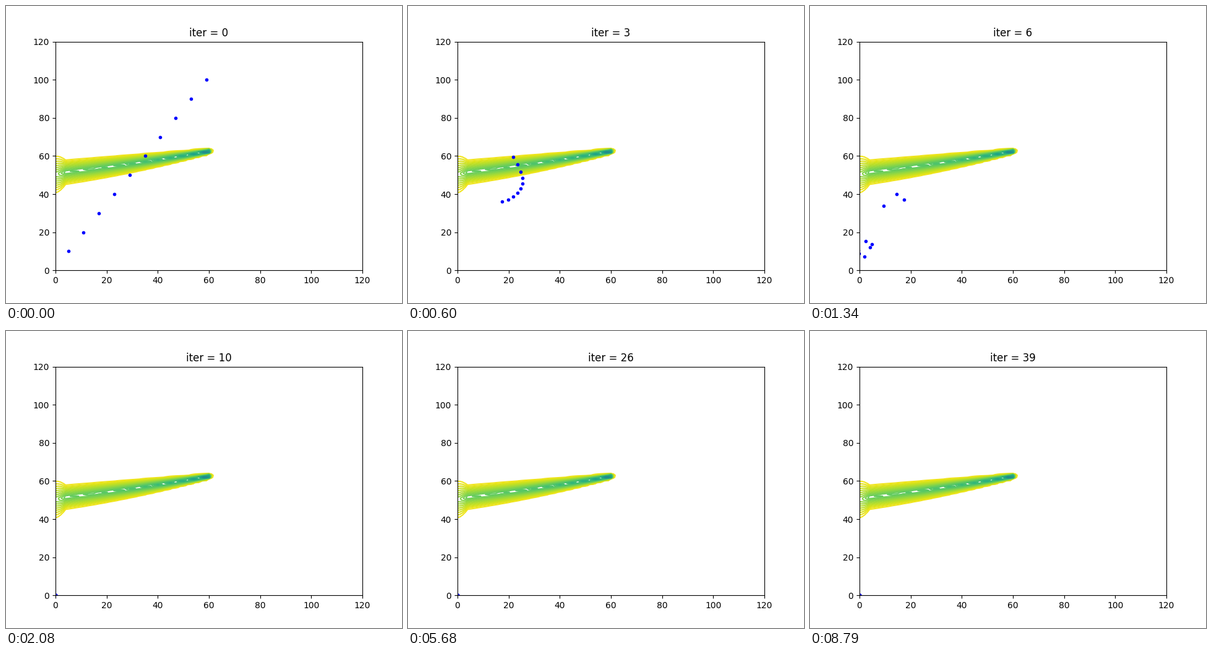
Recreate the animation shown at these times as a matplotlib script. Size 640 by 480 pixels, loop 9.04 s.

```python
import numpy as np
import matplotlib.pyplot as plt
from matplotlib.animation import FuncAnimation

LOOP, STEP = 9040, 20
SOURCE_X = 60
K = np.arange(10)

# Start time in ms of each iteration: the pace slows a little on the way.
STARTS = np.interp(np.arange(41), [0, 8, 14, 17, 30, 33, 40],
                   [0, 1600, 3040, 3730, 6500, 7290, LOOP])

# Stages of the swarm: a straight line, a cluster, a loose drift, the corner.
MOVES = [0, 3, 5, 8]
STAGES = np.array([
    (5 + 6 * K, 10 + 10 * K),
    (17.5 + 8 * np.sin(np.pi * K / 11), 36 + K + 0.18 * K**2),
    (-4 + 2.9 * K + 7 * np.sin(1.75 * K), 17 + 4.8 * K),
    (0 * K, 0 * K),
])


def plume():
    """Concentration of a plume drifting left from its source."""
    axis = np.arange(121.0)
    x, y = np.meshgrid(axis, axis)
    dist = np.maximum(SOURCE_X + 1 - x, 1)
    # The plume fans out against the left wall.
    wall = np.where(x < 4, np.cos(np.pi * x / 8), 0)
    centre = 50.9 + 0.15 * x + 0.0007 * x**2 - 0.6 * wall
    width = 1.3 + 0.155 * dist - 0.00085 * dist**2 + 3.9 * wall
    peak = 13 * (47 / (dist + 1))**0.3 * (1 - 0.25 * wall)
    peak *= np.select([x <= SOURCE_X, x == SOURCE_X + 1], [1, 0.12], 0)
    offset = np.abs(y - centre) / width
    return x, y, peak * np.clip(1 - offset**1.1, 0, None)**1.3


def swarm(tick):
    """Particles move one after another, one per tick."""
    done = (tick + 9 - K) // 10
    return [[np.interp(n, MOVES, STAGES[:, axis, i])
             for i, n in enumerate(done)] for axis in (0, 1)]


plt.rcParams["text.kerning_factor"] = 6
fig, ax = plt.subplots(figsize=(6.4, 4.8), dpi=100)
ax.set(xlim=(0, 120), ylim=(0, 120))
contours = ax.contour(*plume(), levels=np.arange(1, 50), cmap="viridis_r",
                      vmin=0, vmax=50)

# Render the still parts once and reuse them as a backdrop.
ax.spines[:].set_visible(False)
fig.canvas.draw()
backdrop = np.array(fig.canvas.buffer_rgba())
contours.remove()
ax.spines[:].set_visible(True)
ax.set(xticks=[], yticks=[])
ax.patch.set_visible(False)
fig.figimage(backdrop, origin="upper", zorder=-1)

dots, = ax.plot([], [], "b.")
title = ax.set_title("")


def update(frame):
    now = frame * STEP + STEP / 2
    iteration = np.searchsorted(STARTS, now, side="right") - 1
    slot = min(int((now - STARTS[iteration]) // STEP), 9)
    dots.set_data(*swarm(10 * iteration + slot))
    title.set_text(f"iter = {iteration}")
    return dots, title


anim = FuncAnimation(fig, update, frames=LOOP // STEP, interval=STEP,
                     repeat=True, repeat_delay=0)
plt.show()
```
